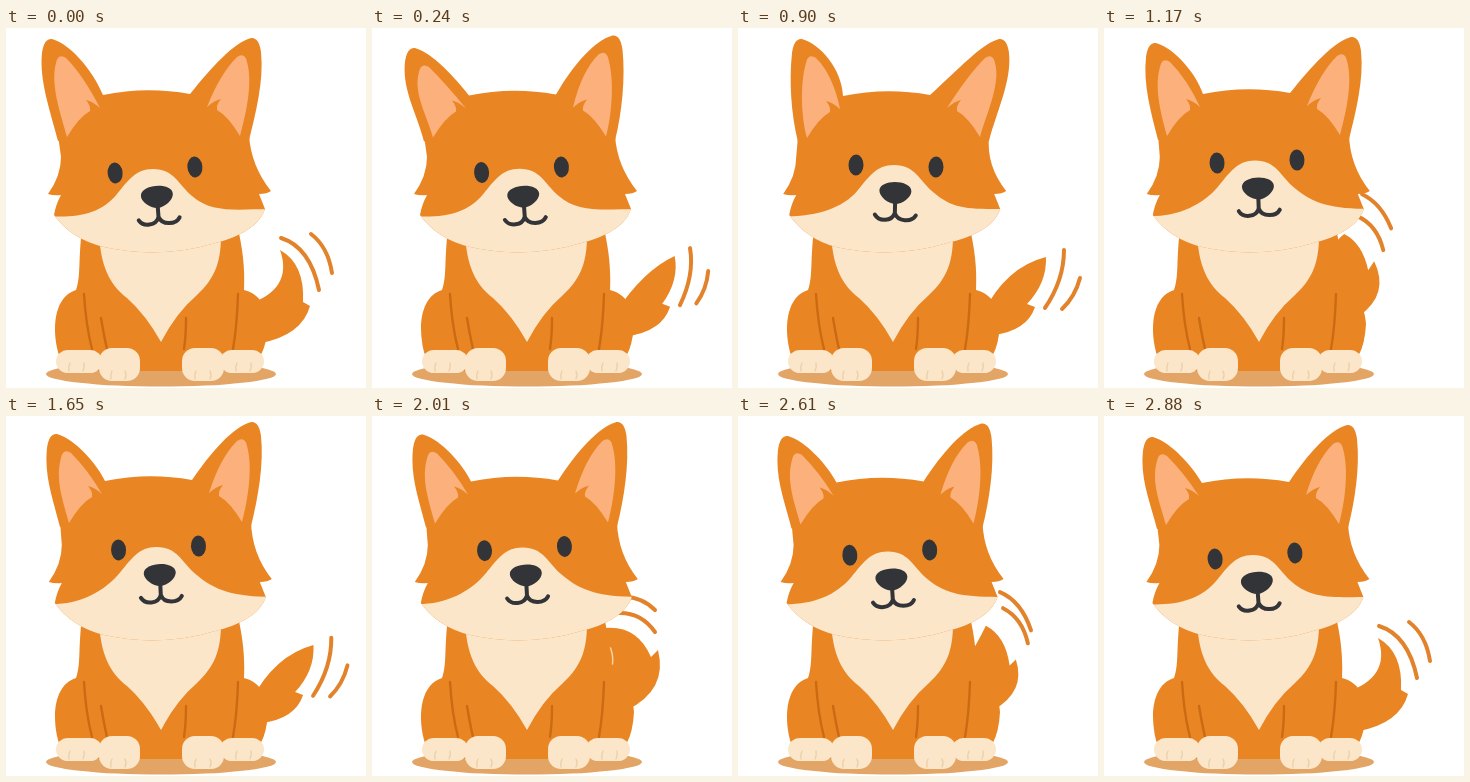
Recreate the animation shown at these times as an HTML page. Size 360 by 360 pixels, loop 2.91 s.

```html
<!DOCTYPE html>
<html lang="en">
<head>
<meta charset="utf-8">
<title>Wagging fox</title>
<style>
  html, body { margin: 0; width: 100%; height: 100%; overflow: hidden; background: #fff; }
  svg { display: block; width: 100vw; height: 100vh; }
  .fur { fill: #e98623; }
  .cream { fill: #fbe6ca; }
  .pink { fill: #fcb17c; }
  .dark { fill: #333437; }
  .line { fill: none; stroke-linecap: round; stroke-linejoin: round; }
  .swish { stroke: #e2822a; stroke-width: 4; }
  .leg { stroke: #cb6a12; stroke-width: 2.4; }
  .toe { stroke: #ecd0aa; stroke-width: 1.4; }
  .smile { stroke: #333437; stroke-width: 4; }
  .lid { stroke: #4b3020; stroke-width: 2; }
</style>
</head>
<body>
<svg viewBox="0 0 360 360">
  <defs><clipPath id="headClip"><path id="headEdge"/></clipPath></defs>
  <ellipse cx="155" cy="346" rx="115" ry="12.5" fill="#e2a565"/>
  <path id="tail" class="fur"/>
  <path id="swish" class="line swish"/>

  <path class="fur" d="M76 200C72 235 75 248 70 262C50 268 45 296 52 324Q56 341 76 343H236Q260 336 262 296C261 276 251 265 238 262C239 240 237 222 231 196Z"/>
  <path id="gap" class="line" d="M238.500 232Q241.500 240 240.500 248" stroke="#f8d3a4" stroke-width="1.500"/>
  <path class="cream" d="M93 203C94 238 104 257 121 270Q140 287 155 314Q170 285 191 267C209 250 216 234 215 200Z"/>
  <path class="line leg" d="M78 266Q80 298 86 321M95 290Q98 308 101 321M180 290Q180 308 178 321M232 266Q231 298 227 321"/>
  <g class="cream">
    <rect x="50" y="322" width="46" height="23" rx="12"/>
    <rect x="214" y="322" width="44" height="23" rx="12"/>
    <rect x="93" y="320" width="41" height="33" rx="13"/>
    <rect x="176" y="320" width="42" height="33" rx="13"/>
  </g>
  <path class="line toe" d="M64 335Q62 339 63 343M78 335Q79 339 77 343M106 343Q104 347 105 351M119 343Q121 347 119 351M190 343Q188 347 189 351M204 343Q206 347 204 351M231 335Q229 339 230 343M245 335Q246 339 244 343"/>

  <path id="earL" class="fur"/><path id="earR" class="fur"/>
  <path id="head" class="fur"/>
  <path id="inL" class="pink"/><path id="inR" class="pink"/>
  <path id="mask" class="cream" clip-path="url(#headClip)"/>
  <g id="face">
    <g id="eyes" class="dark">
      <ellipse id="eyeL" cx="-40" rx="7.500" ry="10.500"/>
      <ellipse id="eyeR" cx="40" rx="7.500" ry="10.500"/>
    </g>
    <path id="lids" class="line lid" d="M-47 4Q-40 5 -34 4M34 4Q40 5 47 4"/>
    <path class="dark" d="M-16 25C-16 13 16 13 16 25C16 31 7 38 0 38S-16 31 -16 25Z"/>
    <path class="line smile" d="M0 36V47M-20 49C-16 56 -3 56 0 47C3 56 17 56 21 49"/>
  </g>
</svg>
<script>
const LOOP = 2910, WAG = LOOP / 4, PEAK = 177;
const $ = id => document.getElementById(id);
const set = (id, d) => $(id).setAttribute('d', d);
const lerp = (a, b, k) => a.map((v, i) => v + (b[i] - v) * k);
const clamp = v => Math.min(1, Math.max(0, v));
const ease = k => k * k * (3 - 2 * k);

// time, eye centre x y, tilt, left ear tip x y, right ear tip x y, head shift x y
const poses = [
  [0,    149, 142,   -4.3, 43, 11, 248, 10, 0, 0],
  [480,  150, 141.5, -3.6, 37, 29, 239, 5,  0, 1],
  [900,  158, 138,   1.4,  61, 11, 264, 11, 8, 1],
  [1170, 153, 133.5, -2.1, 49, 15, 250, 9,  2, -1],
  [1650, 152.5, 132, -2.8, 48, 18, 248, 6,  2, -2],
  [2340, 152.5, 133, -3.2, 48, 19, 247, 6,  2, -1],
  [2880, 151, 140,   -4.3, 46, 21, 246, 9,  1, 0]
];
poses.push([LOOP, ...poses[0].slice(1)]);

// tail outline, ordered from the outer swing to the tucked one
const out  = [245,285, 268,239, 308,229, 309,255, 289,276, 297,279, 289,303, 255,307];
const up   = [240,277, 288,262, 274,222, 299,236, 297,274, 304,278, 296,307, 255,315];
const tuck = [222,240, 224,218, 240,206, 258,215, 264,242, 270,233, 286,266, 255,288];
const high = [220,240, 222,220, 233,212, 265,209, 279,241, 286,234, 296,274, 255,294];
// two swish strokes for the same positions
const outS  = [326,222, 326,252, 307,280, 342,250, 337,269, 324,281];
const upS   = [275,210, 304,219, 313,262, 305,206, 322,219, 326,245];
const tuckS = [258,166, 277,175, 287,200, 253,188, 273,197, 279,222];
const highS = [250,181, 269,180, 283,194, 246,197, 269,196, 283,216];
const stops = [1, 0.05, -0.22, -0.67, -0.87];
const tails = [out, up, up, tuck, high];
const strokes = [outS, upS, upS, tuckS, highS];

function drawTail(t) {
  const u = Math.cos((t - PEAK) / WAG * 2 * Math.PI);
  let i = 0;
  while (i < stops.length - 2 && u < stops[i + 1]) i++;
  const k = clamp((stops[i] - u) / (stops[i] - stops[i + 1]));
  const p = lerp(tails[i], tails[i + 1], k);
  const s = lerp(strokes[i], strokes[i + 1], k);
  set('tail', `M${p.slice(0, 2)}Q${p.slice(2, 6)}Q${p.slice(6, 10)}L${p.slice(10, 12)}Q${p.slice(12)}Z`);
  set('swish', `M${s.slice(0, 2)}Q${s.slice(2, 6)}M${s.slice(6, 8)}Q${s.slice(8)}`);
  $('gap').style.opacity = clamp((-u - 0.75) * 10);
}

// side is 1 for the right ear, -1 for the left; bases follow the head
function drawEar(name, x, y, side, outX, inX, baseY, dx) {
  const at = (a, b) => `${x + side * a} ${y + b} `;
  set('ear' + name,
    `M${outX + dx} ${baseY + 46}C${outX + dx + side * 7} ${baseY + 18} ${at(10, 42)}${at(7, 14)}` +
    `Q${at(5, -1)}${at(-3, 0)}C${at(-21, 5)}${at(-43, 30)}${inX + dx} ${baseY}L${inX + dx - side * 5} ${baseY + 35}Z`);
  const foot = (a, b) => `${outX + dx - side * a} ${baseY + b} `;
  set('in' + name,
    `M${foot(9, 42)}C${foot(3, 20)}${at(-1, 45)}${at(-7, 24)}Q${at(-9, 14)}${at(-17, 19)}` +
    `Q${at(-34, 36)}${foot(42, 13)}Q${foot(34, 6)}${foot(28, 5)}Q${foot(33, 11)}${foot(32, 16)}Q${foot(21, 22)}${foot(9, 42)}Z`);
}

function drawHead(t) {
  let i = 0;
  while (t >= poses[i + 1][0]) i++;
  const a = poses[i], b = poses[i + 1];
  const [, x, y, tilt, lx, ly, rx, ry, dx, dy] = lerp(a, b, ease((t - a[0]) / (b[0] - a[0])));
  const low = dx * 0.4, top = 67 + dy;
  drawEar('L', lx, ly, -1, 52, 97, top, dx);
  drawEar('R', rx, ry, 1, 243, 184, top - 1, dx);

  const edge = `M${97 + dx} ${top}Q${140 + dx} ${top - 9} ${184 + dx} ${top - 1}L${243 + dx} ${top + 40}` +
    `Q${245 + low} 138 ${265 + low} 163Q${261 + low} 166 ${253 + low} 166L${259 + low} 181` +
    `C${254 + low} 196 ${238 + low} 207 213 214Q155 232 98 219Q${65 + low} 211 ${48 + low} 187` +
    `Q${50 + low} 176 ${55 + low} 167Q${48 + low} 168 ${42 + low} 166Q${55 + low} 148 ${55 + low} 129L${52 + dx} ${top + 40}Z`;
  set('head', edge);
  set('headEdge', edge);

  const m = (px, py) => `${x + px} ${y + py} `;
  set('mask', `M40 188C70 190 ${m(-55, 45)}${m(-38, 24)}C${m(-27, 11)}${m(-20, -1)}${m(-2, -1)}` +
    `C${m(19, -1)}${m(23, 14)}${m(37, 26)}C${m(58, 44)}230 181 272 181V240H40Z`);

  $('face').setAttribute('transform', `translate(${x} ${y}) rotate(${tilt})`);
  const shut = clamp((t - 2220) / 75) * clamp((2475 - t) / 75);
  for (const id of ['eyeL', 'eyeR']) {
    $(id).setAttribute('ry', 10.5 * (1 - shut));
    $(id).setAttribute('cy', 4 * shut);
  }
  $('eyes').style.opacity = shut < 1 ? 1 : 0;
  $('lids').style.opacity = shut > 0.85 ? 1 : 0;
}

function draw(now) {
  const t = now % LOOP;
  drawTail(t);
  drawHead(t);
}

const start = performance.now();
function frame() {
  draw(performance.now() - start);
  requestAnimationFrame(frame);
}
frame();
</script>
</body>
</html>
```
